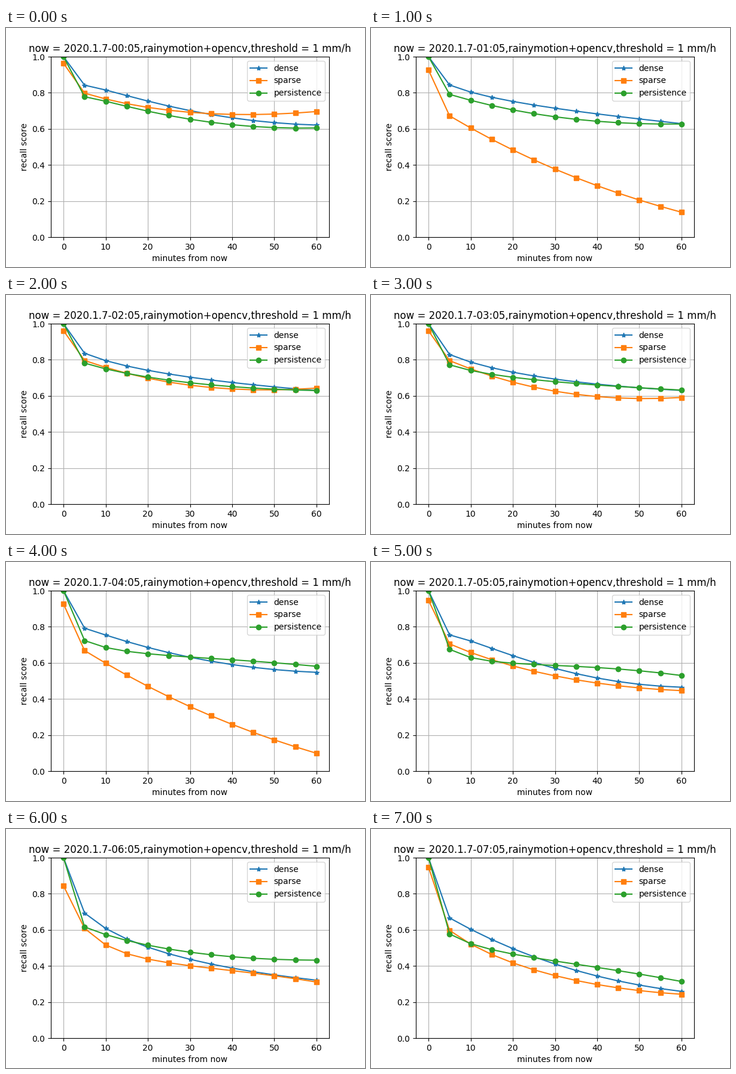
These frames come from a looping animation (600x400 px, 8000 ms). A matplotlib script:

```python
import numpy as np
import matplotlib.pyplot as plt
from matplotlib.animation import FuncAnimation

plt.rcParams["text.kerning_factor"] = 6

HOURS = 8
KEY_MINUTES = np.array([5, 20, 40, 60])
minutes = np.arange(0, 61, 5)

# Per hour: recall at the key minutes; hours left out are blended
dense = {
    0: [.842, .754, .661, .621],
    1: [.843, .752, .683, .629],
    3: [.829, .731, .665, .630],
    5: [.755, .640, .516, .465],
    6: [.693, .504, .388, .321],
    7: [.666, .496, .344, .259],
}
persistence = {
    0: [.778, .698, .623, .605],
    1: [.791, .705, .642, .627],
    3: [.772, .703, .660, .632],
    5: [.675, .598, .574, .530],
    6: [.616, .515, .451, .432],
    7: [.577, .466, .392, .314],
}
sparse = {
    0: [.798, .719, .680, .696],
    1: [.672, .483, .285, .138],
    2: [.796, .698, .638, .643],
    3: [.795, .676, .596, .591],
    4: [.668, .470, .259, .099],
    5: [.705, .583, .488, .446],
    6: [.608, .438, .374, .311],
    7: [.597, .417, .297, .243],
}
sparse_start = [.963, .926, .961, .960, .926, .946, .844, .947]


def curve(keys, hour, start=1):
    """Cubic in sqrt(time) through the hour's keys, after a first drop."""
    points = [np.interp(hour, list(keys), column)
              for column in zip(*keys.values())]
    decay = np.polyfit(np.sqrt(KEY_MINUTES), points, 3)
    return np.append(start, np.polyval(decay, np.sqrt(minutes[1:])))


def scores(hour):
    return (curve(dense, hour),
            curve(sparse, hour, sparse_start[hour]),
            curve(persistence, hour))


fig, ax = plt.subplots(figsize=(6, 4), dpi=100)
fig.subplots_adjust(left=0.125, right=0.9, bottom=0.125, top=0.88)

styles = (("dense", "*"), ("sparse", "s"), ("persistence", "o"))
lines = [ax.plot(minutes, values, marker=marker, label=name)[0]
         for (name, marker), values in zip(styles, scores(0))]

ax.set_xlim(-3, 63)
ax.set_ylim(0, 1)
ax.set_xlabel("minutes from now")
ax.set_ylabel("recall score")
ax.grid()
ax.legend(loc="upper right")
title = ax.set_title("")


def update(hour):
    title.set_text(f"now = 2020.1.7-{hour:02d}:05,"
                   "rainymotion+opencv,threshold = 1 mm/h")
    for line, values in zip(lines, scores(hour)):
        line.set_ydata(values)
    return [title, *lines]


anim = FuncAnimation(fig, update, frames=HOURS, interval=1000, repeat=True)
plt.show()
```
